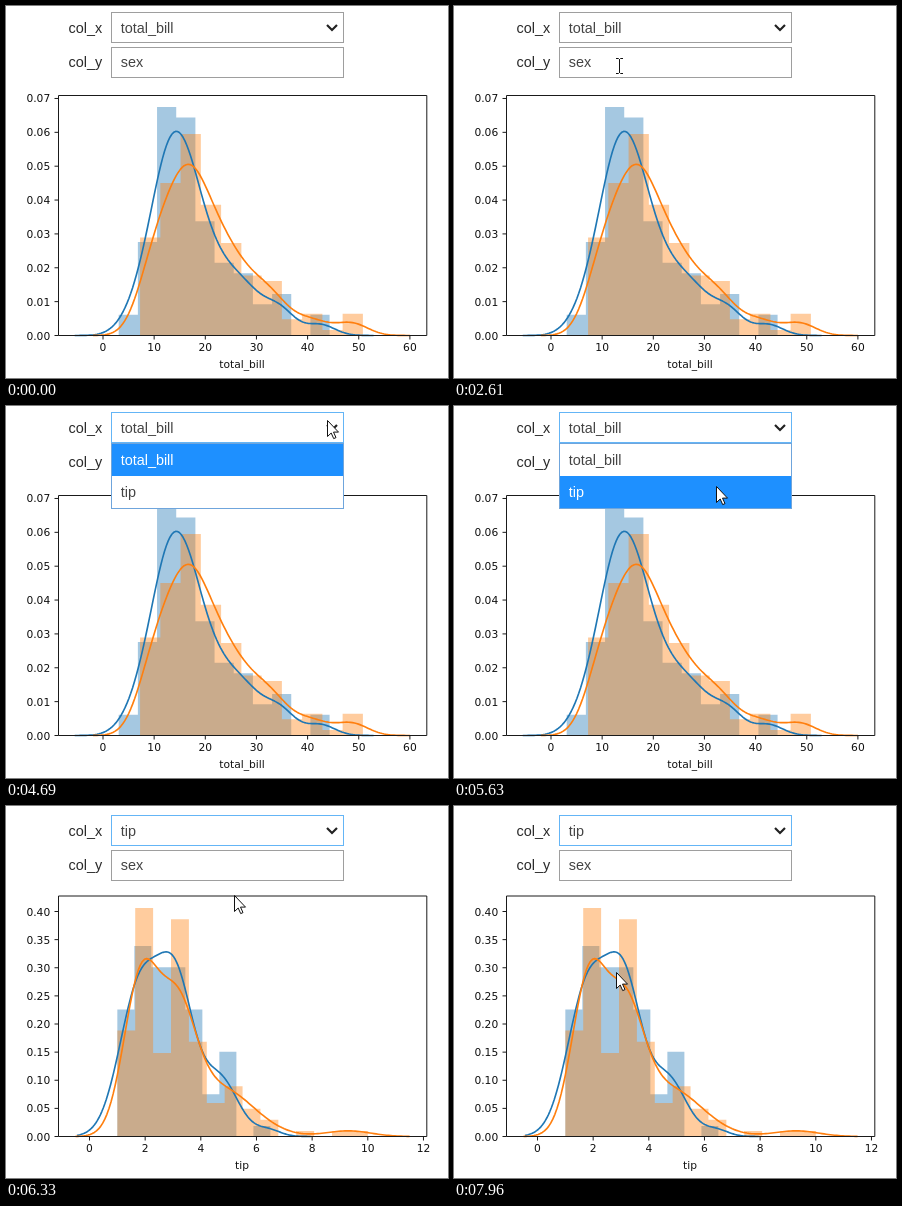
An HTML page that plays this animation: 442 px wide and 372 px high, repeating every 8 s.

```html
<!DOCTYPE html>
<html lang="en">
<head>
<meta charset="utf-8">
<title>Histogram picker</title>
<style>
html, body { margin: 0; width: 100%; height: 100%; overflow: hidden; background: #fff; }
svg { display: block; }
text { font: 14.4px "Liberation Sans", Arial, sans-serif; fill: #444; }
.plot text { font: 10.7px "DejaVu Sans", sans-serif; fill: #111; }
.label { fill: #2a2a2a; }
.axes { fill: none; stroke: #1a1a1a; }
.curve { fill: none; stroke-width: 1.65; stroke-linejoin: round; }
.box { fill: #fff; stroke: #9e9e9e; }
.box.focus { stroke: #64b5f6; }
</style>
</head>
<body>
<svg width="442" height="372" viewBox="0 0 442 372">
  <g id="billPlot" class="plot"></g>
  <g id="tipPlot" class="plot"></g>
  <g id="form">
    <text class="label" x="62.6" y="27">col_x</text>
    <text class="label" x="62.6" y="61">col_y</text>
    <rect id="select" class="box" x="105.5" y="6.5" width="232" height="30"/>
    <text id="value" x="114.7" y="27"></text>
    <path d="M321 19l5 5 5-5" fill="none" stroke="#222" stroke-width="2.2"/>
    <rect class="box" x="105.5" y="41.5" width="232" height="30"/>
    <text x="114.7" y="61">sex</text>
  </g>
  <g id="popup">
    <rect x="105.5" y="37.5" width="232" height="65" fill="#fff" stroke="#6fa5dc"/>
    <rect id="hover" x="106" width="231" height="32" fill="#1e90ff"/>
    <text id="item0" x="114.7" y="59">total_bill</text>
    <text id="item1" x="114.7" y="91">tip</text>
  </g>
  <g id="cursor">
    <path id="arrow" d="M.5 .5v16l3.7-3.5 2.5 5.6 2.3-1-2.5-5.5h5z" fill="#fff" stroke="#111"/>
    <path id="beam" d="M0 .5h2.5l1 1 1-1H7M3.5 1v14M0 15.5h2.5l1-1 1 1H7" fill="none" stroke="#111"/>
  </g>
</svg>
<script>
const $ = id => document.getElementById(id);
const BLUE = '#1f77b4', ORANGE = '#ff7f0e';
const LEFT = 52.5, RIGHT = 420.8, LOOP = 8000;

const sum = list => list.reduce((a, b) => a + b, 0);
const binWidth = s => (s.max - s.min) / s.counts.length;

// Density histogram: the total area of the bars is one
function bars(s, X, Y, base) {
  const w = binWidth(s), total = sum(s.counts);
  const d = s.counts.map((n, i) => n ?
    `M${X(s.min + i * w)} ${base}V${Y(n / total / w)}H${X(s.min + (i + 1) * w)}V${base}z` : '').join('');
  return `<path d="${d}" fill="${s.color}" fill-opacity=".4"/>`;
}

// Kernel density: one Gaussian [mean, deviation, height] per bin
function kernels(s) {
  const w = binWidth(s), dev = s.pad / 3, area = sum(s.counts) * dev * Math.sqrt(2 * Math.PI);
  return s.counts.map((n, i) => [s.min + (i + .5) * w, dev, n / area]);
}

function curve(s, X, Y) {
  const bumps = s.bumps || kernels(s), from = s.min - s.pad, span = s.max - s.min + 2 * s.pad;
  const pts = Array.from({ length: 161 }, (_, i) => {
    const v = from + span * i / 160;
    return [X(v), Y(sum(bumps.map(([mean, dev, h]) => h * Math.exp(-(((v - mean) / dev) ** 2) / 2))))];
  });
  return `<path class="curve" stroke="${s.color}" d="M${pts.join('L')}"/>`;
}

function plot({ top, base, x0, xUnit, xStep, xTicks, yUnit, yStep, yTicks, name, series }) {
  const X = v => x0 + v * xUnit, Y = v => base - v * yUnit;
  let ticks = '', labels = '';
  for (let i = 0; i < xTicks; i++) {
    const x = X(i * xStep);
    ticks += `M${x} ${base}v4`;
    labels += `<text x="${x}" y="${base + 15.8}" text-anchor="middle">${i * xStep}</text>`;
  }
  for (let i = 0; i < yTicks; i++) {
    const y = Y(i * yStep);
    ticks += `M${LEFT} ${y}h-4`;
    labels += `<text x="44.2" y="${y + 4}" text-anchor="end">${(i * yStep).toFixed(2)}</text>`;
  }
  return series.map(s => bars(s, X, Y, base)).join('') +
    series.map(s => curve(s, X, Y)).join('') +
    `<path class="axes" d="M${LEFT} ${top}H${RIGHT}V${base}H${LEFT}z${ticks}"/>` + labels +
    `<text x="236" y="${base + 32.5}" text-anchor="middle">${name}</text>`;
}

$('billPlot').innerHTML = plot({
  top: 89.5, base: 329.5, x0: 97, xUnit: 5.115, xStep: 10, xTicks: 7,
  yUnit: 3386, yStep: .01, yTicks: 8, name: 'total_bill',
  series: [
    { color: BLUE, min: 3.07, max: 44.3, pad: 8.6, counts: [2, 9, 22, 21, 11, 7, 6, 3, 4, 0, 2] },
    { color: ORANGE, min: 7.25, max: 50.81, pad: 9.2, counts: [18, 28, 37, 24, 17, 11, 10, 3, 4, 1, 4] }
  ]
});

// Tips cluster at round amounts, so their curves are given as a few bumps
$('tipPlot').innerHTML = plot({
  top: 90, base: 330.5, x0: 83.5, xUnit: 27.83, xStep: 2, xTicks: 7,
  yUnit: 562.5, yStep: .05, yTicks: 9, name: 'tip',
  series: [{
    color: BLUE, min: 1, max: 6.5, pad: 1.45, counts: [12, 18, 16, 16, 12, 4, 8, 0, 1],
    bumps: [[1.8, .72, .262], [3.12, .64, .257], [4.7, .65, .1], [6.4, .45, .012]]
  }, {
    color: ORANGE, min: 1, max: 10, pad: 1.5, counts: [19, 41, 15, 39, 17, 6, 9, 5, 3, 0, 1, 0, 1, 1],
    bumps: [[1.85, .62, .275], [3.15, .65, .2], [4.7, 1.2, .085], [9.3, .8, .01]]
  }]
});

// Pointer moves: start, end, number of steps, evenly timed way points
const moves = [
  [840, 1380, 8, [[415, 124], [380, 50], [334, 19]]],
  [1460, 1610, 3, [[318, 16], [278, 36]]],
  [1690, 1840, 3, [[225, 45], [121, 45]]],
  [2070, 2070, 1, [[127, 56]]],
  [2530, 2610, 2, [[150, 54], [162, 52]]],
  [2840, 3300, 7, [[200, 54], [350, 64], [410, 69], [346, 58]]],
  [3760, 4070, 5, [[344, 45], [321, 14]]],
  [5320, 5930, 9, [[318, 24], [262, 80], [228, 89]]],
  [7040, 7810, 11, [[235, 82], [285, 41], [346, 80], [310, 225], [275, 248], [200, 200]]],
  [7890, 7960, 2, [[180, 182], [162, 166]]]
];

function pointer(t) {
  const move = moves.filter(m => t >= m[0]).pop();
  if (!move) return null;
  const [start, end, steps, pts] = move;
  if (t >= end) return pts[pts.length - 1];
  const step = Math.floor((t - start) / (end - start) * (steps - 1) + 1e-6);
  const u = step / (steps - 1) * (pts.length - 1), i = Math.floor(u);
  return pts[i].map((v, k) => v + (pts[i + 1][k] - v) * (u - i));
}

const show = (id, on) => $(id).setAttribute('display', on ? 'inline' : 'none');

function draw(t) {
  const open = t >= 4610 && t < 6100, redrawn = t >= 6330;
  const pos = pointer(t);
  show('billPlot', !redrawn);
  show('tipPlot', redrawn);
  $('form').setAttribute('transform', `translate(0 ${redrawn ? 3 : 0})`);
  $('select').classList.toggle('focus', t >= 4530);
  $('value').textContent = t < 6160 ? 'total_bill' : 'tip';

  show('popup', open);
  const item = open && pos[1] > 70 ? 1 : 0;
  $('hover').setAttribute('y', 38 + item * 32);
  for (const i of [0, 1]) $('item' + i).style.fill = i === item ? '#fff' : '#444';

  show('cursor', pos);
  if (!pos) return;
  const [x, y] = pos.map(Math.round);
  const overInput = !open && x > 105 && x < 338 && y > 41 && y < 74;
  show('beam', overInput);
  show('arrow', !overInput);
  $('cursor').setAttribute('transform', `translate(${x} ${y})`);
}

const begin = performance.now();
function tick() {
  draw((performance.now() - begin) % LOOP);
  requestAnimationFrame(tick);
}
tick();
</script>
</body>
</html>
```
